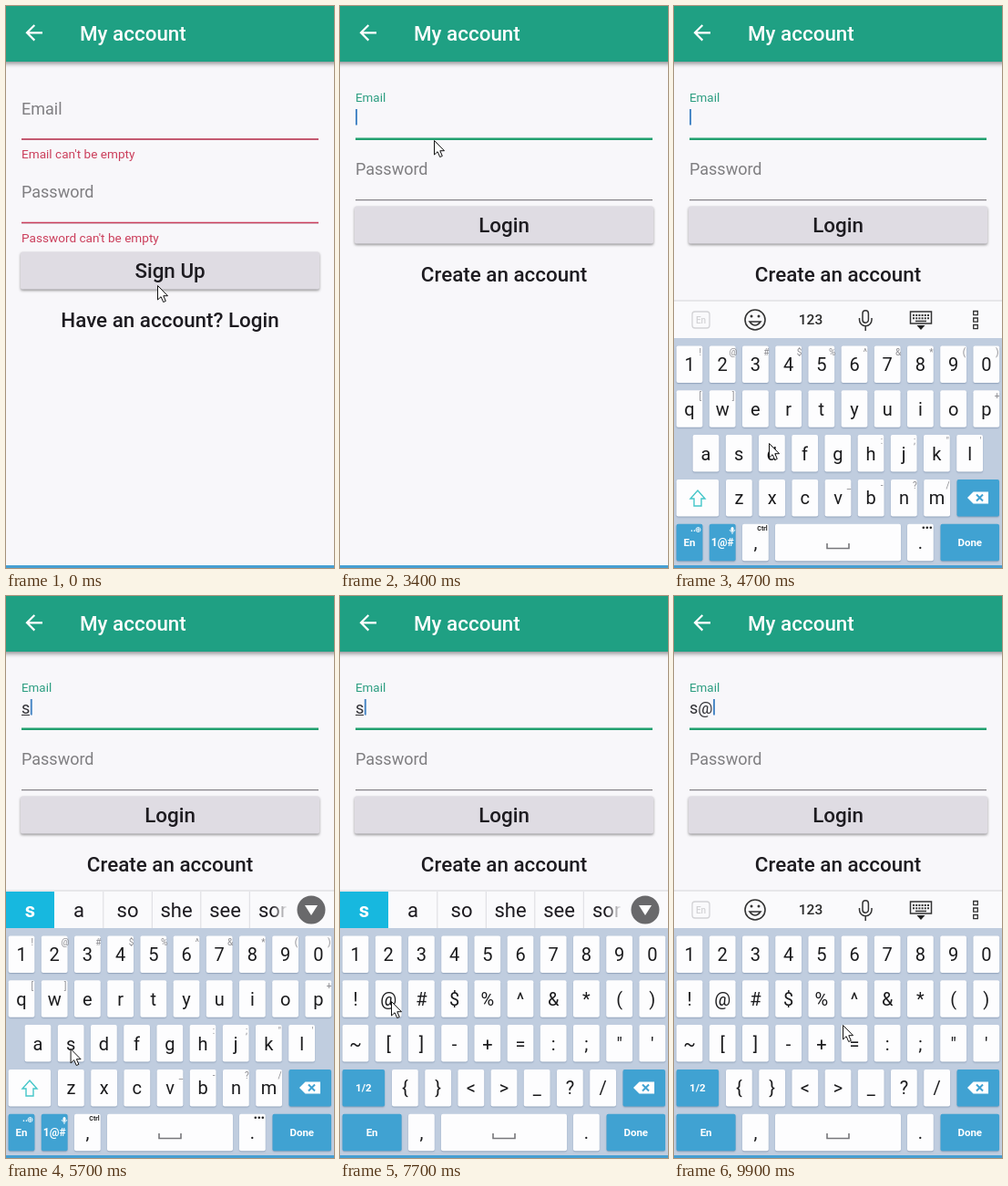
Animation, 360 px wide and 616 px high, one loop 10000 ms. Source, as an HTML page with a canvas:

```html
<!DOCTYPE html>
<html lang="en">
<head>
<meta charset="utf-8">
<title>My account</title>
<style>
  html, body { margin: 0; width: 100%; height: 100%; overflow: hidden; background: #f8f7fa; }
  canvas { display: block; width: 360px; height: 616px; }
</style>
</head>
<body>
<canvas id="stage"></canvas>
<script>
const LOOP = 10000, STEP = 100;
const INK = '#1d1b20', GREY = '#7f7e81', RED = '#cb3f5c', GREEN = '#21a06f', BLUE = '#40a2d2', CYAN = '#17b8df';
const LOGIN_AT = 1500, FOCUS_AT = 3200, KEYBOARD_AT = 3700, TYPE_S = 5600, SYMBOLS_AT = 6900, TYPE_AT = 7980;

// time, x, y of the pointer tip
const POINTER = [
  [0, 166, 306], [500, 137, 179], [1000, 173, 346], [1800, 173, 346], [2400, 99, 134],
  [2500, 99, 134], [2600, 99, 133], [3000, 99, 133], [3400, 103, 147], [4100, 103, 147],
  [4700, 104, 479], [5200, 72, 488], [5600, 72, 488], [6200, 53, 596], [6850, 53, 596],
  [7700, 56, 444], [8400, 56, 444], [8800, 309, 500], [9000, 346, 549], [9200, 340, 545],
  [9400, 340, 545], [9600, 318, 585], [9900, 185, 470], [LOOP, 185, 470]
];
const PRESSES = [['s', 5400, 5700], ['1@#', 6600, 6900], ['@', 7900, 8100]];
const LETTERS = ['1234567890', 'qwertyuiop', 'asdfghjkl', 'zxcvbnm'];
const SYMBOLS = ['1234567890', '!@#$%^&*()', '~[]-+=:;"\'', '{}<>_?/'];
const HINTS = ['!@#$%^&*()', '[]       +', '     :;"\'', '   _-?/'];

const canvas = document.getElementById('stage');
const ratio = window.devicePixelRatio || 1;
canvas.width = 360 * ratio;
canvas.height = 616 * ratio;
const c = canvas.getContext('2d');

const clamp = v => Math.max(0, Math.min(1, v));
const smooth = v => v * v * (3 - 2 * v);
const progress = (t, start, length) => clamp((t - start) / length);

function rect(x, y, w, h, color, r = 0) {
  c.fillStyle = color;
  c.beginPath();
  c.roundRect(x, y, w, h, r);
  c.fill();
}

function text(s, x, y, size, color = INK, weight = 400, align = 'left') {
  c.font = `${weight} ${size}px Roboto, sans-serif`;
  c.textAlign = align;
  c.fillStyle = color;
  c.fillText(s, x, y);
}

function stroke(path, color, width = 1.5) {
  c.strokeStyle = color;
  c.lineWidth = width;
  c.stroke(new Path2D(path));
}

function fill(path, color) {
  c.fillStyle = color;
  c.fill(new Path2D(path));
}

function faded(alpha, draw) {
  if (alpha <= 0) return;
  c.save();
  c.globalAlpha = alpha;
  draw();
  c.restore();
}

function shadowed(blur, dy, color, draw) {
  c.save();
  c.shadowBlur = blur * ratio;
  c.shadowOffsetY = dy * ratio;
  c.shadowColor = color;
  draw();
  c.restore();
}

function header() {
  shadowed(5, 2, 'rgba(0,0,0,.45)', () => rect(-10, -10, 380, 71, '#1fa083'));
  stroke('M40 29.3H23.5M31.3 21L23 29.3L31.3 37.6', '#fff', 2.2);
  text('My account', 81, 37.5, 22.4, '#fff', 500);
}

function button(label, y) {
  shadowed(3, 1.5, 'rgba(0,0,0,.4)', () => rect(16, y, 328, 41, '#dfdce3', 2));
  text(label, 180, y + 28.5, 22.4, INK, 500, 'center');
}

function caretVisible(t) {
  const start = t >= TYPE_AT ? TYPE_AT : t >= TYPE_S ? TYPE_S : FOCUS_AT + 50;
  const half = start === TYPE_AT ? 480 : 500;
  return t >= FOCUS_AT && Math.floor(Math.max(0, t - start) / half) % 2 === 0;
}

function emailField(t) {
  const float = smooth(progress(t, FOCUS_AT - 50, 200));
  const typed = t >= TYPE_AT ? 's@' : t >= TYPE_S ? 's' : '';
  text('Email', 17, 119.3 - 14 * float, 18 - 4.6 * float, float > .5 ? '#2b9d80' : GREY);
  text(typed, 17, 128.5, 18, '#303034');
  const width = c.measureText(typed).width;
  if (typed === 's') rect(17, 130, 9, 1, '#303034');
  if (caretVisible(t)) rect(17 + width + (typed ? .5 : 0), 113, 2, 17.5, '#4a88c6');
  faded(float, () => rect(17, 144.6, 326, 2.3, GREEN));
}

function form(t) {
  const signUp = t < LOGIN_AT;
  const passwordY = signUp ? 210 : 185.3;
  const lineY = signUp ? 236.9 : 211.9;
  const error = 1 - progress(t, LOGIN_AT, 200);
  if (t < FOCUS_AT) rect(17, 145.4, 326, 1.3, '#858387');
  rect(17, lineY, 326, 1.3, '#858387');
  faded(error, () => {
    rect(17, 145.3, 326, 1.5, RED);
    rect(17, lineY - .1, 326, 1.5, RED);
  });
  emailField(t);
  text('Password', 17, passwordY, 18, GREY);
  if (signUp) {
    text("Email can't be empty", 17, 167.3, 13.6, RED);
    text("Password can't be empty", 17, 259.3, 13.6, RED);
    button('Sign Up', 269.5);
    if (t >= 1400) rect(43, 324, 274, 40, '#e9e7ec', 2);
    text('Have an account? Login', 180, 352, 22.4, INK, 500, 'center');
  } else {
    button('Login', 219.5);
    faded(1 - progress(t, 1600, 300), () => rect(65, 274, 216, 40, '#e5e3e8', 2));
    text('Create an account', 180, 302.3, 22.4, INK, 500, 'center');
  }
}

function toolbar() {
  c.strokeStyle = '#d3d3d6';
  c.lineWidth = 1.3;
  c.beginPath();
  c.roundRect(20, 335, 19, 18, 3);
  c.stroke();
  text('En', 29.5, 348, 10, '#d3d3d6', 500, 'center');
  stroke('M100 344A11 11 0 1 1 78 344A11 11 0 1 1 100 344M83 346Q89 354 95 346Z', '#333', 1.6);
  for (const x of [85, 93]) rect(x - 1.5, 338.5, 3, 3, '#333', 1.5);
  text('123', 150, 349, 15.5, '#2b2b2b', 500, 'center');
  stroke('M207 337A3 3 0 0 1 213.4 337V344A3.2 3.2 0 0 1 207 344ZM203.5 342V344A6.7 6.7 0 0 0 217 344V342M210.2 351V356', '#333', 1.5);
  stroke('M259.5 335H282.5V348H259.5Z', '#333', 1.5);
  for (let i = 0; i < 6; i++) {
    rect(262 + i * 3.2, 338, 2, 2, '#333');
    rect(262 + i * 3.2, 341.3, 2, 2, '#333');
  }
  rect(265, 344.7, 12, 1.5, '#333');
  fill('M266.5 350H275.5L271 355Z', '#222');
  for (const y of [334.5, 342, 349.5]) stroke(`M328.7 ${y}h4.6v4.2h-4.6Z`, '#333', 1.3);
}

function suggestions() {
  rect(0, 324, 53, 40, CYAN);
  ['s', 'a', 'so', 'she', 'see'].forEach((word, i) => {
    const x = 26.5 + i * 53.5;
    text(word, x, 352, 22, i ? INK : '#fff', i ? 400 : 700, 'center');
    if (i) rect(x + 26.3, 324, 1, 40, '#dcdce0');
  });
  const fade = c.createLinearGradient(292, 0, 309, 0);
  fade.addColorStop(0, INK);
  fade.addColorStop(1, 'rgba(29,27,32,0)');
  text('sor', 277, 352, 22, fade);
  rect(319.5, 328.5, 31, 31, '#69696b', 15.5);
  fill('M328 339H342L335 350Z', '#fff');
}

function key(x, w, row, label, t, { color = '#fdfdfe', ink = '#1b1b1d', size = 20, weight = 400, hint = '' } = {}) {
  const y = 372.5 + row * 48.8;
  const pressed = PRESSES.some(([name, from, to]) => name === label && t >= from && t < to);
  shadowed(1.5, 1, 'rgba(70,95,130,.4)', () => rect(x, y, w, 40.5, pressed ? CYAN : color, 2));
  const baseline = y + (size < 15 ? 24 : 27.5);
  text(label, x + w / 2, baseline, size, pressed ? '#1d5d74' : ink, weight, 'center');
  text(hint, x + w - 2.5, y + 10, 10, '#8b8b90', 400, 'center');
}

function smallMic(x, y, color) {
  rect(x - 1.5, y - 4, 3, 5, color, 1.5);
  stroke(`M${x - 3} ${y - 1}Q${x} ${y + 5} ${x + 3} ${y - 1}M${x} ${y + 2}V${y + 4}`, color, .8);
}

function keys(t) {
  const symbols = t >= SYMBOLS_AT;
  const action = { color: BLUE, ink: '#fff', size: 11.5, weight: 700 };
  (symbols ? SYMBOLS : LETTERS).forEach((letters, row) => {
    const left = row === 3 ? 57 : row === 2 && !symbols ? 20.6 : 2.6;
    [...letters].forEach((letter, i) =>
      key(left + i * 36.2, 28.8, row, letter, t, { hint: symbols ? '' : HINTS[row][i].trim() }));
  });

  key(2.6, 46.5, 3, symbols ? '1/2' : '', t, symbols ? action : {});
  if (!symbols) stroke('M26 531L34 540H30V548H22V540H18Z', '#45c6c9', 1.4);
  key(310.5, 46.5, 3, '', t, action);
  fill('M322 539L328.5 532.5H345V545.5H328.5Z', '#fff');
  stroke('M332 535.5L339 542.5M339 535.5L332 542.5', BLUE, 2);

  key(2.6, symbols ? 65 : 28.8, 4, 'En', t, action);
  if (!symbols) {
    key(38.8, 28.8, 4, '1@#', t, { ...action, size: 12 });
    text('..', 18, 576, 10, '#fff', 700);
    stroke('M29 574A2.5 2.5 0 1 1 24 574A2.5 2.5 0 1 1 29 574M24 574H29M26.5 571.5V576.5', '#fff', .8);
    smallMic(64, 575, t >= 6600 ? '#1d5d74' : '#fff');
  }
  key(75, 28.8, 4, ',', t);
  key(111, 138, 4, '', t);
  stroke('M168 589V594.5H192V589', '#77777b', 1.6);
  key(256, 28.8, 4, '.', t);
  if (!symbols) {
    text('Ctrl', 97, 575, 7, '#222', 700, 'center');
    for (let i = 0; i < 3; i++) rect(272.5 + i * 4, 570.5, 2.6, 2.6, '#222', 1.3);
  }
  key(292.5, 64.5, 4, 'Done', t, action);
}

function keyboard(t) {
  const shown = progress(t, KEYBOARD_AT, 400);
  if (!shown) return;
  c.save();
  c.translate(0, 293 * (1 - shown) ** 2);
  rect(0, 323, 360, 293, '#fafafc');
  rect(0, 322.5, 360, 1, '#d5d5d9');
  rect(0, 364, 360, 252, '#c0cddf');
  if (t >= TYPE_S && t < TYPE_AT) suggestions();
  else toolbar();
  keys(t);
  c.restore();
}

function pointer(t) {
  const i = POINTER.findIndex(p => p[0] > t);
  const [t0, x0, y0] = POINTER[i - 1], [t1, x1, y1] = POINTER[i];
  const k = smooth((t - t0) / (t1 - t0));
  c.save();
  c.translate(x0 + (x1 - x0) * k + .5, y0 + (y1 - y0) * k + .5);
  const arrow = 'M0 0V15.5L3.6 12.2L6.2 18L8.8 16.9L6.3 11.2H11Z';
  fill(arrow, '#fff');
  stroke(arrow, '#111', 1);
  c.restore();
}

function draw(now) {
  // The screen refreshes ten times a second.
  const t = Math.floor(now % LOOP / STEP) * STEP;
  c.setTransform(ratio, 0, 0, ratio, 0, 0);
  rect(0, 0, 360, 616, '#f8f7fa');
  form(t);
  header();
  keyboard(t);
  rect(0, 613, 360, 3, '#469fd3');
  pointer(t);
}

const start = performance.now();
function frame() {
  draw(performance.now() - start);
  requestAnimationFrame(frame);
}
frame();
</script>
</body>
</html>
```
